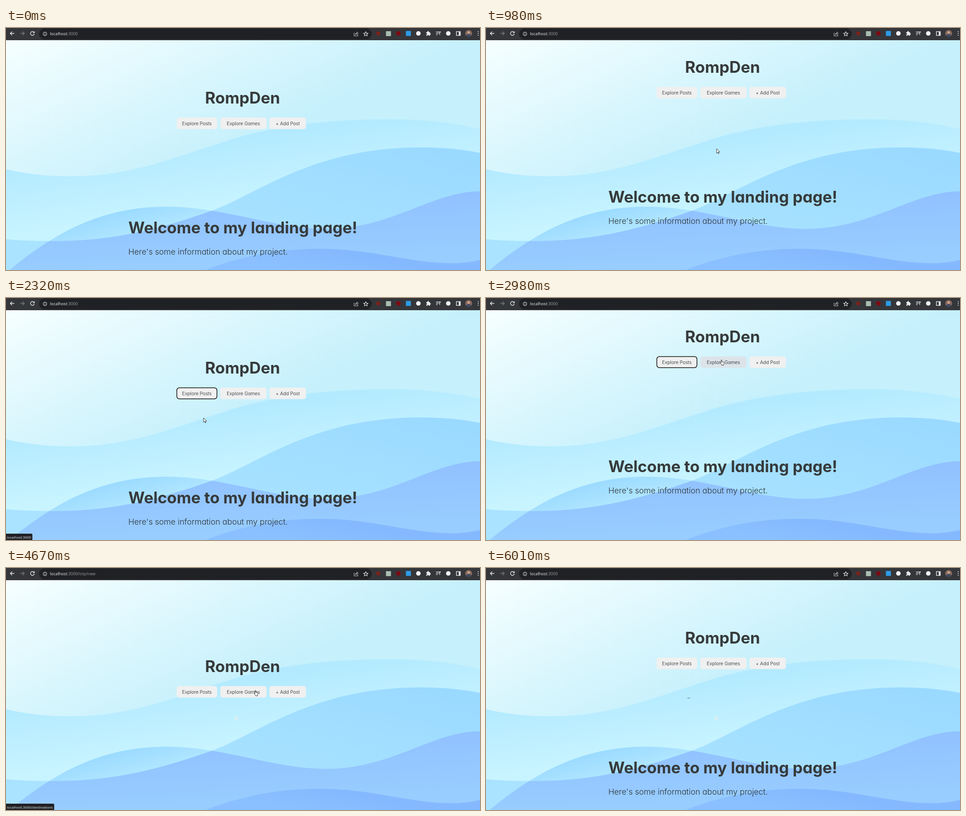
Recreate the animation shown at these times as an HTML page. Size 1046 by 535 pixels, loop 6.68 s.

```html
<!DOCTYPE html>
<html lang="en">
<head>
<meta charset="utf-8">
<title>RompDen</title>
<style>
  html, body { margin: 0; height: 100%; overflow: hidden; background: #c5f0fc; }
  svg { display: block; width: 100vw; height: 100vh; }
  text { font-family: "Open Sans", "Noto Sans", sans-serif; }
  .page text { font-family: Inter, Lato, sans-serif; font-feature-settings: "cv11"; fill: #363a3b; }
  .page .h { font-size: 34.9px; font-weight: 700; }
  .page .p { font-size: 17.7px; font-weight: 300; fill: #2b3336; }
  .page .b { font-size: 10.4px; font-weight: 300; fill: #1d2022; }
  .mid { text-anchor: middle; }
  .line { fill: none; stroke: #e8eaed; stroke-width: 1.4; }
</style>
</head>
<body>
<svg viewBox="0 0 1046 535">
  <defs>
    <g id="grads"></g>
    <path id="w1" d="M0 312C50 324 95 328 145 328C290 328 400 274 525 238C640 208 745 202 850 202C925 202 990 210 1046 223V535H0z"/>
    <path id="w2" d="M0 467C35 470 70 471 105 471C245 471 350 441 457 403C560 364 680 264 915 264C965 264 1005 268 1046 276V535H0z"/>
    <path id="w3" d="M8 535C40 508 70 487 97 470C190 412 275 395 355 395C480 395 590 444 705 444C855 444 940 361 1046 361V535z"/>
    <path id="w4" d="M440 535C520 504 600 488 692 488C810 488 890 520 985 520C1008 520 1028 517 1046 513V535z"/>
    <clipPath id="in2"><use href="#w2"/></clipPath>
    <path id="arrow" d="M0 0V9.6L2.2 7.6 3.7 11 5.2 10.3 3.8 7.1H6.8z"/>
    <path id="hand" d="M2.4 7.6V1.2Q3.2 0 4 1.2V4.6L8 5.6Q9 6 8.8 7.4L8 11V12.6H3.6V11.4L.4 7.8Q.4 6.4 2.4 7.6z"/>
  </defs>

  <rect y="27" width="1046" height="508" fill="url(#sky)"/>
  <use href="#w1" fill="url(#g1)"/>
  <use href="#w3" fill="url(#g3)"/>
  <use href="#w2" fill="url(#g2)"/>
  <use href="#w3" fill="url(#g23)" clip-path="url(#in2)"/>
  <use href="#w4" fill="url(#g4)"/>

  <g class="page" id="page">
    <text class="h mid" x="522" y="167">RompDen</text>
    <g id="buttons"></g>
    <rect id="ring" x="377" y="198.5" width="88.5" height="24.5" rx="5.5" fill="none" stroke="#111" stroke-width="1.5"/>
    <g id="intro">
      <text class="h" x="270" y="454">Welcome to my landing page!</text>
      <text class="p" x="270" y="501">Here's some information about my project.</text>
    </g>
  </g>

  <use id="trace" href="#arrow" x="506" y="326" fill="#e9ecec"/>
  <path id="dash" d="M444.5 287.5h6" stroke="#6f8790" stroke-width="1.4"/>

  <!-- browser bar -->
  <rect width="1046" height="27" fill="#35363a"/>
  <rect x="73" y="1" width="734" height="24" rx="12" fill="#202124"/>
  <g class="line">
    <path d="M18.5 12H9.5M13.5 8L9.5 12 13.5 16"/>
    <path d="M31.5 12H40.5M36.5 8L40.5 12 36.5 16" stroke="#77797d"/>
    <path d="M61.6 9.4A4.2 4.2 0 1 0 62.4 13M62.6 7.4V10.6H59.4"/>
    <g stroke-width="1"><circle cx="86" cy="13" r="4"/><path d="M86 12.4V15.4M86 10.4V11.4"/></g>
    <path stroke="#c4c7cb" stroke-width="1" d="M769 11H768V17.5H776.5V15M770.5 15Q771 11 774.5 11V8.6L777.5 11.8 774.5 14.6V12.6Q772 12.4 770.5 15z"/>
    <path stroke-width="1.1" d="M794 8.2L795.4 11.4 798.8 11.7 796.2 14 797 17.4 794 15.6 791 17.4 791.8 14 789.2 11.7 792.6 11.4z"/>
    <path d="M949 8.6H957M949 11.6H955M949 14.6H952.5M957 15V8.6H960"/>
    <rect x="994" y="8" width="8.6" height="8.4"/>
    <path d="M1000.6 8V16.4" stroke-width="3"/>
  </g>
  <circle cx="821.5" cy="12" r="4.6" fill="#7b2219"/>
  <rect x="838.5" y="7" width="11" height="11" fill="#a9bdb0"/>
  <circle cx="866" cy="12" r="5" fill="#7d0b12"/>
  <rect x="882.5" y="6.5" width="11" height="11" fill="#2f9be6"/>
  <circle cx="910" cy="12" r="5" fill="#f1f3f4"/>
  <path d="M927.5 9H930Q930 6.6 931.5 6.6T933 9H935.5V11.4Q937.6 11.4 937.6 13T935.5 14.4V17H932.8Q932.8 15 931.4 15T930 17H927.5V14.4Q929.4 14.2 929.4 13T927.5 11.6z" fill="#eceef0"/>
  <circle cx="976" cy="12" r="5" fill="#f1f3f4"/>
  <circle cx="1021" cy="12" r="7.6" fill="#8a6a5c"/>
  <path d="M1015 16.6A7.6 7.6 0 0 0 1027 16.6Q1021 10 1015 16.6z" fill="#3d4a68"/>
  <circle cx="1021" cy="10" r="2.8" fill="#c9a58d"/>
  <g fill="#e8eaed"><circle cx="1042" cy="8" r="1.1"/><circle cx="1042" cy="12" r="1.1"/><circle cx="1042" cy="16" r="1.1"/></g>
  <text x="97" y="16" font-size="9.1" fill="#9aa0a6"><tspan fill="#f1f3f4">localhost</tspan><tspan id="path"></tspan></text>

  <g id="bubble">
    <path id="bubbleBox" fill="#202124"/>
    <text id="bubbleText" x="2" y="531.5" font-size="7.9" fill="#e8eaed"></text>
  </g>
  <circle id="spot" cx="441" cy="274" r="8" fill="#d3dc3c" opacity=".85"/>
  <use id="cursor" fill="#fff" stroke="#222" stroke-width=".9" stroke-linejoin="round"/>
</svg>

<script>
const $ = id => document.getElementById(id);
const show = (id, on) => $(id).style.display = on ? '' : 'none';

// id, x1, y1, x2, y2, from, to
$('grads').innerHTML = [
  ['sky', 0, 27, 180, 421, '#f6ffff', '#c5f0fc'],
  ['g1', 0, 310, 20, 460, '#b3eaff', '#c8f4ff'],
  ['g2', 915, 264, 840, 560, '#9bdaff', '#a9e3ff'],
  ['g3', 300, 394, 320, 470, '#9cdbff', '#b8eaff'],
  ['g23', 0, 410, 6, 540, '#91c1ff', '#98cdff'],
  ['g4', 690, 488, 680, 540, '#85b9ff', '#8ac0ff']
].map(([id, x1, y1, x2, y2, a, b]) =>
  `<linearGradient id="${id}" gradientUnits="userSpaceOnUse" x1="${x1}" y1="${y1}" x2="${x2}" y2="${y2}">
   <stop stop-color="${a}"/><stop offset="1" stop-color="${b}"/></linearGradient>`).join('');

$('buttons').innerHTML = [['Explore Posts', 376.5, 89.5], ['Explore Games', 473, 102], ['+ Add Post', 581.5, 80.5]]
  .map(([label, x, w]) => `<rect x="${x}" y="198" width="${w}" height="25.5" rx="5"/>
   <text class="b mid" x="${x + w / 2}" y="214.5">${label}</text>`).join('');
const boxes = [...$('buttons').querySelectorAll('rect')];

const REST = '#f0f0f0', WARM = '#dce4ea', HOT = '#9cc0dc';
const GAMES = '/destinations', ADD = '/trip/new';

// at: start in ms, dy: page offset, cur: [shape, x, y], hot: [button, colour], tip: path in the status bubble
const steps = [
  { at: 0 },
  { at: 330, cur: ['arrow', 683, 223] },
  { at: 650, dy: -22, cur: ['arrow', 590, 248] },
  { at: 980, dy: -68, cur: ['arrow', 509, 267] },
  { at: 1320, cur: ['arrow', 436, 250] },
  { at: 1650, cur: ['hand', 432, 207], hot: [0, WARM] },
  { at: 1990, cur: ['hand', 432, 207], hot: [0, HOT], ring: 1, tip: '' },
  { at: 2320, cur: ['arrow', 436, 265], ring: 1, tip: '' },
  { at: 2640, dy: -59, cur: ['arrow', 490, 205], ring: 1 },
  { at: 2980, dy: -69, cur: ['hand', 516.5, 136], hot: [1, WARM], ring: 1 },
  { at: 3340, dy: 63, path: GAMES, cur: ['arrow', 507, 211] },
  { at: 3670, dy: 63, path: GAMES, cur: ['arrow', 506, 326] },
  { at: 4000, dy: 63, path: GAMES, cur: ['arrow', 621, 250] },
  { at: 4330, dy: 63, path: GAMES, cur: ['hand', 620, 270], hot: [2, WARM], tip: ADD },
  { at: 4670, dy: 63, path: ADD, cur: ['hand', 547, 270], tip: GAMES },
  { at: 5010, dy: 63, path: ADD, cur: ['hand', 437.5, 273.5], hot: [0, WARM], tip: '' },
  { at: 5340, dy: 63, path: ADD, cur: ['hand', 437.5, 273.5], hot: [0, HOT], spot: 1, tip: '' },
  { at: 5680, tip: '' },
  { at: 6010 }
];
const LOOP = 6680;
let last;

function draw(s) {
  const { at, dy = 0, path = '', cur, hot, ring, spot, tip } = s;
  $('page').setAttribute('transform', `translate(0 ${dy})`);
  $('path').textContent = ':3000' + path;
  boxes.forEach((box, i) => box.setAttribute('fill', hot && hot[0] === i ? hot[1] : REST));
  show('ring', ring);
  show('spot', spot);
  show('intro', !path);
  show('trace', at >= 4000);
  show('dash', at >= 5680);
  show('cursor', cur);
  if (cur) {
    $('cursor').setAttribute('href', '#' + cur[0]);
    $('cursor').setAttribute('transform', `translate(${cur[1]} ${cur[2]})`);
  }
  show('bubble', tip !== undefined);
  if (tip !== undefined) {
    $('bubbleText').textContent = 'localhost:3000' + tip;
    const w = $('bubbleText').getComputedTextLength() + 5;
    $('bubbleBox').setAttribute('d', `M0 521H${w - 2}Q${w} 521 ${w} 523V535H0z`);
  }
}

function tick() {
  const t = performance.now() % LOOP;
  const step = steps.findLast(s => s.at <= t);
  if (step !== last) draw(last = step);
  requestAnimationFrame(tick);
}
tick();
</script>
</body>
</html>
```
